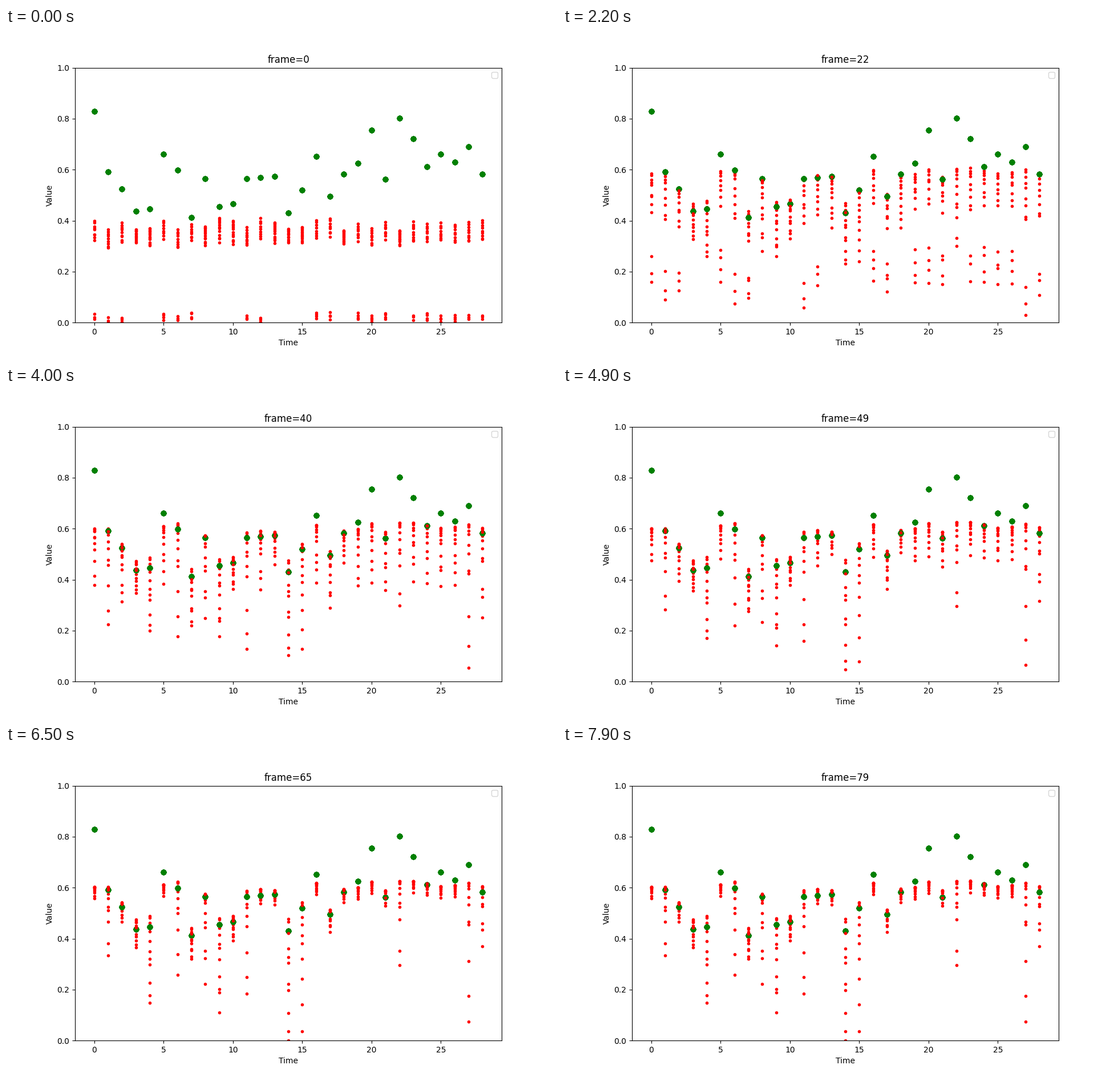
Recreate the animation shown at these times as a matplotlib script. Size 966 by 580 pixels, loop 8000 ms.

```python
import numpy as np
import matplotlib.pyplot as plt
from matplotlib.animation import FuncAnimation

FRAMES, STEP_MS = 80, 100
RUNS, OVER = 12, 3  # dots per column, and how many lie above the green ones

ACTUAL = np.array([
    829, 591, 524, 437, 447, 662, 599, 413, 565, 454, 467, 565, 569, 574, 431,
    519, 652, 496, 582, 625, 755, 563, 801, 721, 612, 662, 630, 690, 582]) / 1000
UNSPLIT = [3, 4, 8, 9, 10, 13, 14, 15, 18, 22]  # columns that begin as one group
STRAGGLERS = [14, 15, 27, 9, 4, 11, 8, 6, 22, 1, 28]  # long tails, deepest first

N = len(ACTUAL)
x = np.arange(N)
rng = np.random.default_rng(4)

# Rank of every dot in its column: 0 is the top, 1 the bottom
rank = np.linspace(0, 1, RUNS)[:, None] + rng.uniform(-0.04, 0.04, (RUNS, N))
rank[0], rank[-1] = 0, 1
order = rng.permuted(np.tile(np.arange(RUNS)[:, None], (1, N)), axis=0)
rank = np.take_along_axis(rank, order, axis=0)

split = ~np.isin(x, UNSPLIT)
pull = np.clip(0.6 - ACTUAL, 0, None)  # low values draw their column down
first_top = 0.385 + rng.uniform(-0.025, 0.025, N)
last_top = 0.615 - 0.85 * pull + rng.uniform(-0.015, 0.015, N)
first_low = np.where(split, 0.01, 0.31) + rng.uniform(-0.01, 0.01, N)
last_low = last_top - 0.045 - 0.4 * pull
last_low[STRAGGLERS] = np.linspace(0, 0.37, len(STRAGGLERS))
last_skew = 3.2 - 10 * pull


def smooth(u):
    u = np.clip(u, 0, 1)
    return u * u * (3 - 2 * u)


def lerp(a, b, u):
    return a + (b - a) * u


def predictions(t):
    top = lerp(first_top, last_top, 1 - np.exp(-t / 9))
    low = lerp(first_low, last_low, smooth(t / 65))
    # Early on, columns split into two groups; later they trail downwards
    groups = np.where(rank < 0.72, 0.2 * rank / 0.72,
                      1 - (0.07 + t / 200) * (1 - rank) / 0.28)
    trail = rank ** lerp(1.3, last_skew, smooth(t / 60))
    shape = lerp(trail, groups, split * np.clip(1 - t / 45, 0, 1))
    return top - (top - low) * shape


fig, ax = plt.subplots(figsize=(9.66, 5.8), dpi=100)
xs = np.tile(x, (RUNS, 1))
under, = ax.plot(xs[OVER:].ravel(), np.zeros((RUNS - OVER) * N), "r.")
ax.plot(xs.ravel(), np.tile(ACTUAL, RUNS), "o", color="green")
over, = ax.plot(xs[:OVER].ravel(), np.zeros(OVER * N), "r.")
ax.set_ylim(0, 1)
ax.set_xlabel("Time")
ax.set_ylabel("Value")
ax.legend([], [], loc="upper right")
title = ax.set_title("frame=0")


def update(t):
    y = predictions(t)
    under.set_ydata(y[OVER:].ravel())
    over.set_ydata(y[:OVER].ravel())
    title.set_text(f"frame={t}")
    return under, over, title


anim = FuncAnimation(fig, update, frames=FRAMES, interval=STEP_MS,
                     repeat=True, repeat_delay=0)
plt.show()
```
